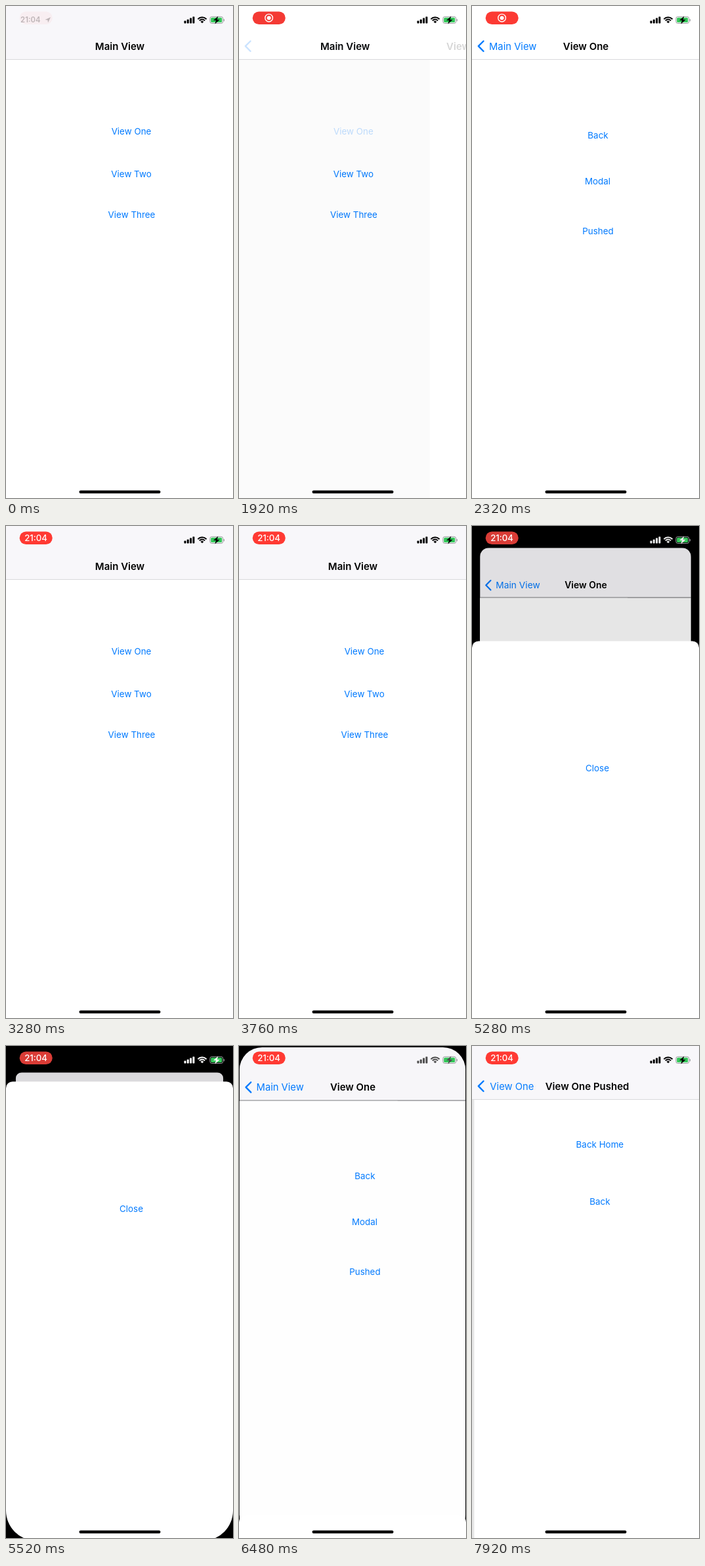
Animation, 346 px wide and 750 px high, one loop 8 s. Source, as an HTML page with a canvas:

```html
<!DOCTYPE html>
<html lang="en">
<head>
<meta charset="utf-8">
<title>Navigation demo</title>
<style>
  html, body { margin: 0; width: 100%; height: 100%; overflow: hidden; background: #fff; }
  canvas { display: block; width: 346px; height: 750px; }
</style>
</head>
<body>
<canvas id="stage"></canvas>
<script>
const W = 346, H = 750, LOOP = 8000, BAR = 82;
const BLUE = '#007aff', FONT = 'Inter, Roboto, sans-serif';
const canvas = document.getElementById('stage');
const ratio = window.devicePixelRatio || 1;
canvas.width = W * ratio;
canvas.height = H * ratio;
const c = canvas.getContext('2d');

// Buttons: label, x, y, times at which they are tapped
const screens = {
  main: { title: 'Main View', buttons: [
    ['View One', 191, 191, 1840, 3780], ['View Two', 191, 256], ['View Three', 191.5, 318]] },
  one: { title: 'View One', back: 'Main View', buttons: [
    ['Back', 192, 197, 2680], ['Modal', 191.5, 267, 5060], ['Pushed', 192, 343, 7560]] },
  pushed: { title: 'View One Pushed', back: 'View One', buttons: [
    ['Back Home', 191.5, 150], ['Back', 191.5, 237]] }
};

// Navigation steps: start, lower screen, upper screen, direction
const steps = [
  [1890, 'main', 'one', 1], [2740, 'main', 'one', -1],
  [3840, 'main', 'one', 1], [7620, 'one', 'pushed', 1]
];

const clamp = v => Math.max(0, Math.min(1, v));
const mix = (a, b, k) => a + (b - a) * k;
const ramp = (t, from, length) => clamp((t - from) / length);

// cubic-bezier(.36, .66, .04, 1)
function ease(x) {
  if (x <= 0 || x >= 1) return clamp(x);
  const curve = (s, a, b) => 3 * (1 - s) * (1 - s) * s * a + 3 * (1 - s) * s * s * b + s ** 3;
  let lo = 0, hi = 1;
  for (let i = 0; i < 24; i++) {
    const mid = (lo + hi) / 2;
    if (curve(mid, .36, .04) < x) lo = mid; else hi = mid;
  }
  return curve(lo, .66, 1);
}

function keyed(t, keys) {
  for (let i = 1; i < keys.length; i++) {
    const [a, u] = keys[i - 1], [b, v] = keys[i];
    if (t <= b) return mix(u, v, ramp(t, a, b - a));
  }
  return keys[keys.length - 1][1];
}

function faded(alpha, paint) {
  if (alpha <= 0) return;
  c.save();
  c.globalAlpha *= alpha;
  paint();
  c.restore();
}

function text(str, x, y, size, color, weight = 400, align = 'center') {
  c.font = `${weight} ${size}px ${FONT}`;
  c.textAlign = align;
  c.fillStyle = color;
  c.fillText(str, x, y);
}

function box(x, y, w, h, r, color) {
  c.beginPath();
  c.roundRect(x, y, w, h, r);
  c.fillStyle = color;
  c.fill();
}

function shape(points, color) {
  c.beginPath();
  points.forEach(([x, y]) => c.lineTo(x, y));
  c.closePath();
  c.fillStyle = color;
  c.fill();
}

function tapAlpha(t, times) {
  return Math.min(1, ...times.map(at =>
    t < at || t > at + 500 ? 1 : mix(.25, 1, ramp(t, at + 150, 350))));
}

function button(t, [label, x, y, ...taps]) {
  faded(tapAlpha(t, taps), () => text(label, x, y + 5, 13.4, BLUE));
}

function page(t, screen, x, dim) {
  c.save();
  c.translate(x, 0);
  c.fillStyle = '#fff';
  c.fillRect(0, BAR, W, H - BAR);
  screen.buttons.forEach(b => button(t, b));
  c.restore();
  c.fillStyle = `rgba(0,0,0,${dim})`;
  c.fillRect(0, BAR, W, H - BAR);
}

function chevron() {
  c.beginPath();
  c.moveTo(17.5, 53.5);
  c.lineTo(9.8, 61.2);
  c.lineTo(17.5, 69);
  c.strokeStyle = BLUE;
  c.lineWidth = 2.4;
  c.lineCap = c.lineJoin = 'round';
  c.stroke();
}

function navBar(t, lower, upper, p) {
  c.fillStyle = t > 1840 && t < 2480 ? '#fff' : '#f8f7fa';
  c.fillRect(0, 0, W, 81);
  c.fillStyle = '#d9d9dc';
  c.fillRect(0, 81, W, 1);
  const travel = p ** 1.22, y = 66.6;
  faded(lower.back ? 1 : p * 1.3, chevron);
  if (lower.back)
    faded(1 - p * 1.5, () => text(lower.back, 26 - 90 * p, y, 14.8, BLUE, 400, 'left'));
  faded(1 - p * p, () => text(lower.title, 173.5 - 111 * travel, y, 15, '#000', 600));
  if (p > 0) {
    c.font = `400 14.8px ${FONT}`;
    const home = 26 + c.measureText(upper.back).width / 2;
    faded(p * p, () => text(upper.back, mix(173.5, home, travel), y, 14.8, BLUE));
    faded(p, () => text(upper.title, 173.5 + 211 * (1 - p), y, 15, '#000', 600));
  }
}

function navigation(t) {
  let lower = 'main', upper = 'one', p = 0, way = 1;
  for (const [start, low, up, dir] of steps) {
    if (t < start) break;
    const e = ease((t - start) / 400);
    [lower, upper, way, p] = [low, up, dir, dir > 0 ? e : 1 - e];
  }
  const low = screens[lower], up = screens[upper];
  page(t, low, -104 * p, way > 0 ? .1 * p : 0);
  if (p > 0) page(t, up, W * (1 - p), 0);
  navBar(t, low, up, p);
}

function signal(color) {
  for (let i = 0; i < 4; i++) box(271.5 + i * 4.3, 22.5 - i * 2.1, 3, 4 + i * 2.1, .8, color);
}

function wifi(color) {
  const x = 299, y = 26.3;
  c.strokeStyle = c.fillStyle = color;
  c.lineWidth = 2;
  c.lineCap = 'butt';
  for (const r of [9, 5.7]) {
    c.beginPath();
    c.arc(x, y, r, -Math.PI * .76, -Math.PI * .24);
    c.stroke();
  }
  c.beginPath();
  c.moveTo(x, y);
  c.arc(x, y, 3.3, -Math.PI * .76, -Math.PI * .24);
  c.fill();
}

function battery(color) {
  c.beginPath();
  c.roundRect(310.8, 16.3, 20, 10.2, 3);
  c.strokeStyle = '#9a9a9e';
  c.lineWidth = 1;
  c.stroke();
  box(331.8, 19.7, 1.2, 3.6, .6, '#9a9a9e');
  box(312.2, 17.7, 17, 7.4, 1.6, '#34c759');
  shape([[323.3, 15.4], [316, 22], [320, 22], [318.4, 27.4], [325.8, 20.7], [321.8, 20.7]], color);
}

function recordPill(t) {
  const dark = keyed(t, [[0, 0], [900, .5], [1920, .25], [2440, 0], [4200, 0], [4400, .45],
    [4880, .9], [5520, .85], [6400, 0], [6800, 0], [7200, .8], [7640, 0]]);
  const color = `rgb(${mix(255, 211, dark)},${mix(58, 60, dark)},${mix(51, 55, dark)})`;
  faded(mix(.04, 1, ramp(t, 0, 320)), () => {
    box(20.7, 8.5, 50, 19.5, 9.7, color);
    const time = ramp(t, 2480, 240);
    faded(1 - time, () => {
      c.beginPath();
      c.arc(45.6, 18.2, 5.8, 0, 7);
      c.strokeStyle = '#fff';
      c.lineWidth = 1.4;
      c.stroke();
      c.beginPath();
      c.arc(45.6, 18.2, 3, 0, 7);
      c.fillStyle = '#fff';
      c.fill();
    });
    faded(time, () => text('21:04', 45.6, 23, 13.2, '#fff', 500));
  });
}

function statusBar(t, modal) {
  const v = Math.round(255 * modal ** .4), color = `rgb(${v},${v},${v})`;
  signal(color);
  wifi(color);
  battery(color);
  faded(.25 * (1 - ramp(t, 0, 240)), () => {
    text('21:04', 37.3, 25.3, 11.3, '#000', 600);
    shape([[68, 17], [59.5, 21], [63.6, 21.5], [64, 25.5]], '#000');
  });
  recordPill(t);
}

function draw(t) {
  const modal = ease((t - 5120) / 500) - ease((t - 6215) / 500);
  c.setTransform(ratio, 0, 0, ratio, 0, 0);
  c.fillStyle = modal > 0 ? '#000' : '#fff';
  c.fillRect(0, 0, W, H);

  c.save();
  if (modal > 0) {
    const s = 1 - .0856 * modal;
    c.translate(W * (1 - s) / 2, 40.6 * modal);
    c.scale(s, s);
    c.beginPath();
    c.roundRect(0, 0, W, H, mix(36, 10, modal));
    c.clip();
  }
  navigation(t);
  c.fillStyle = `rgba(0,0,0,${.12 * modal})`;
  c.fillRect(0, 0, W, H);
  c.restore();

  if (modal > 0) {
    c.save();
    c.translate(0, mix(H, 50, modal));
    box(0, 0, W, 700, [10, 10, 46, 46], '#fff');
    button(t, ['Close', 191, 194, 6060]);
    c.restore();
  }
  statusBar(t, modal);
  box(111.5, 738.6, 124, 4.4, 2.2, '#000');
}

function tick(now) {
  draw(now % LOOP);
  requestAnimationFrame(tick);
}
draw(0);
requestAnimationFrame(tick);
</script>
</body>
</html>
```
